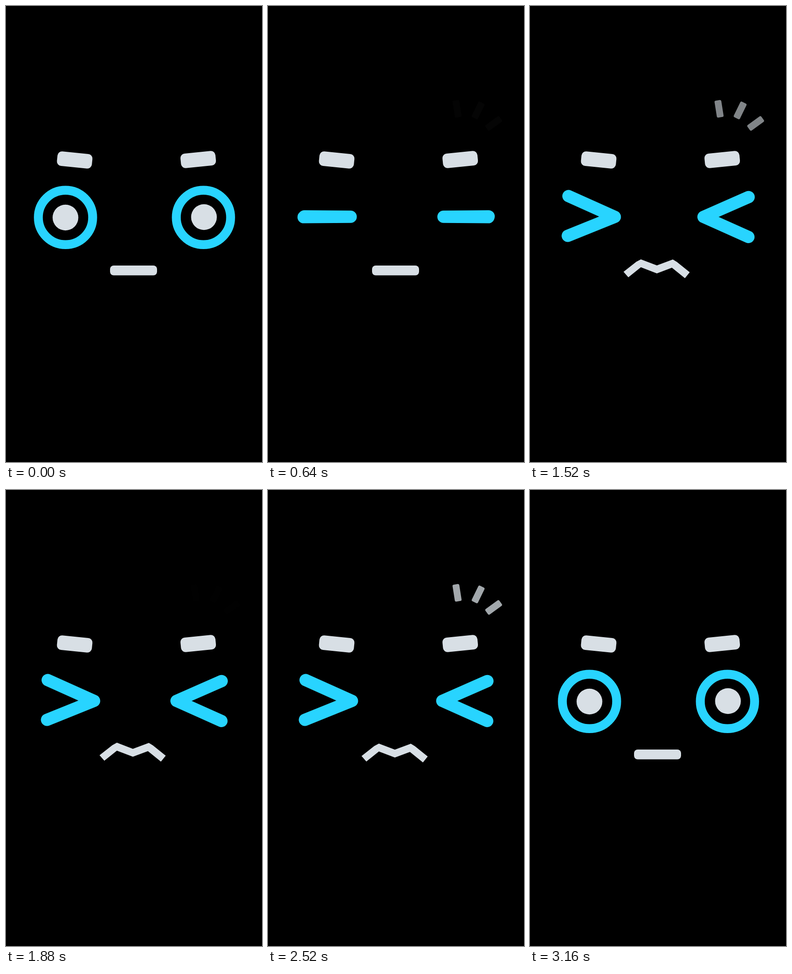
These frames come from a looping animation (561x998 px, 5000 ms). An HTML page with a canvas:

```html
<!DOCTYPE html>
<html>
<head>
<meta charset="utf-8">
<style>
  html, body { margin: 0; height: 100%; overflow: hidden; background: #000; }
  canvas { display: block; }
</style>
</head>
<body>
<canvas id="stage" width="561" height="998"></canvas>
<script>
const ctx = document.getElementById('stage').getContext('2d');
const CYAN = '#28d4ff', GREY = '#d8dfe5';
const LOOP = 5000, BLINK = 430, HURT = 640, CALM = 3140;
const PULSE = 487, PULSE_PEAK = 2845;

const progress = (t, from, to) => Math.max(0, Math.min(1, (t - from) / (to - from)));
const easeInOut = k => k * k * (3 - 2 * k);
const easeOut = k => 1 - (1 - k) ** 3;
const mix = (a, b, k) => a + (b - a) * k;

function bar(cx, cy, w, h, r, deg = 0) {
  ctx.save();
  ctx.translate(cx, cy);
  ctx.rotate(deg * Math.PI / 180);
  ctx.beginPath();
  ctx.roundRect(-w / 2, -h / 2, w, h, r);
  ctx.fill();
  ctx.restore();
}

function trace(points) {
  ctx.beginPath();
  points.forEach(([x, y]) => ctx.lineTo(x, y));
}

function circle(x, y, r) {
  ctx.beginPath();
  ctx.arc(x, y, r, 0, 2 * Math.PI);
}

function roundEye(x, pupilX, pupilY, squash) {
  ctx.save();
  ctx.translate(x, 462.7);
  ctx.scale(mix(1, 1.32, squash), mix(1, 0.2, squash));
  ctx.lineWidth = 19.5;
  circle(0, 0, 59.5);
  ctx.stroke();
  circle(pupilX, pupilY, 28.2);
  ctx.fill();
  ctx.restore();
}

// A chevron whose arms fold onto one line when open is 0.
function chevron(points, dx, open) {
  ctx.lineWidth = 27;
  trace(points.map(([x, y]) => [x + dx, mix(461.3, y, open)]));
  ctx.stroke();
}

function flatMouth() {
  bar(279.5, 578.75, 103, 21.5, 8);
}

function zigzagMouth(dy) {
  ctx.save();
  ctx.translate(0, dy);
  trace([[205, 582], [233, 560], [243, 554.7], [278, 568], [313, 555], [322, 560.5],
    [350, 583], [339.5, 596], [311, 573], [278, 585.3], [243, 572], [215.5, 594]]);
  ctx.fill();
  ctx.restore();
}

function calmFace(t) {
  const squash = t < HURT ? easeInOut(progress(t, BLINK, HURT)) : 0;
  roundEye(130.4, -0.1, 0.3, squash);
  roundEye(432.7, 1.1, -0.7, squash);
  flatMouth();
}

function hurtFace(t) {
  // One pulse drives the squeeze, the mouth and the fading marks.
  const p = (1 + Math.cos((t - PULSE_PEAK) / PULSE * 2 * Math.PI)) / 2;
  const open = easeOut(progress(t, HURT, HURT + 160));
  chevron([[83.5, 416], [185, 461.5], [82, 503]], 12 * p - 4, open);
  chevron([[479.5, 418.2], [380.7, 461.5], [479, 505.5]], 4 - 11 * p, open);

  const rise = easeOut(progress(t, HURT + 20, HURT + 260));
  if (rise > 0) zigzagMouth(mix(60, 0, rise) + 0.8 - 2.4 * p);
  else flatMouth();

  ctx.globalAlpha = (1 - p) * open;
  bar(414.3, 225, 15, 37.5, 3, -9);
  bar(460.5, 228.5, 15, 38, 3, 26);
  bar(494.5, 257, 15, 37.5, 3, 54);
  ctx.globalAlpha = 1;
}

function draw(t) {
  ctx.clearRect(0, 0, 561, 998);
  ctx.strokeStyle = CYAN;
  ctx.fillStyle = GREY;
  ctx.lineCap = ctx.lineJoin = 'round';
  bar(150.5, 337, 77, 32, 10, 5.7);
  bar(421.2, 336, 77, 32, 10, -5.7);
  if (t >= HURT && t < CALM) hurtFace(t);
  else calmFace(t);
}

const start = performance.now();
function tick() {
  // The first callback may share the start time, so never go below zero.
  draw(Math.max(0, performance.now() - start) % LOOP);
  requestAnimationFrame(tick);
}
tick();
</script>
</body>
</html>
```
